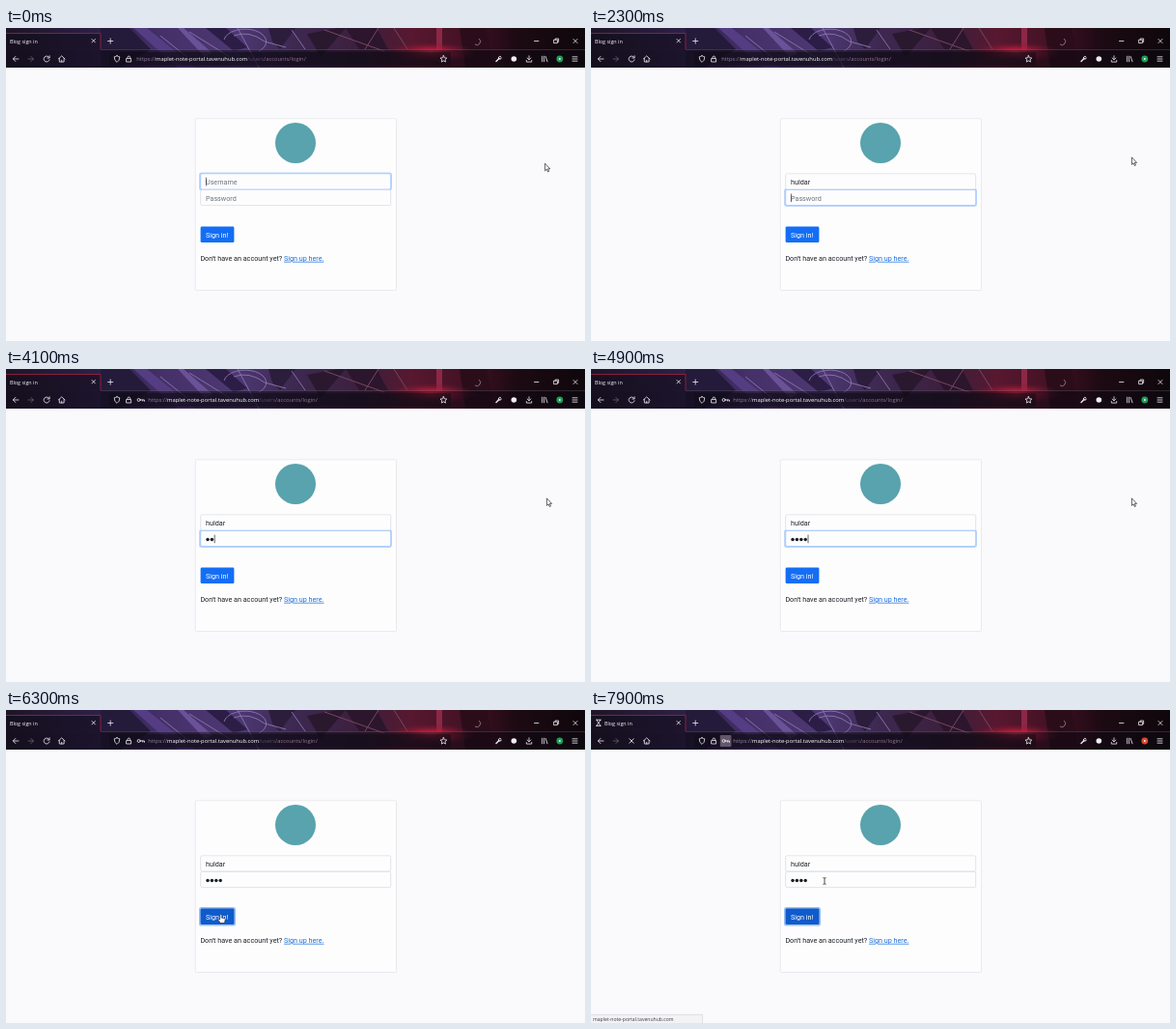
Animation, 600 px wide and 324 px high, one loop 8000 ms. Source, as an HTML page:

```html
<!DOCTYPE html>
<html lang="en">
<head>
<meta charset="utf-8">
<title>Blog sign in</title>
<style>
  html, body { margin: 0; width: 100%; height: 100%; overflow: hidden; background: #faf9fb; }
  svg { display: block; width: 600px; height: 324px; }
  .page { font: 7.2px Roboto, sans-serif; fill: #1c2024; }
  .chrome { font: 5.4px "Open Sans", "Noto Sans", sans-serif; fill: #f8f6fa; }
  .icon { fill: none; stroke: #f1eef4; stroke-width: .8; stroke-linecap: round; stroke-linejoin: round; }
  .hint { fill: #6c757d; }
  .field { fill: #fdfdfe; stroke: #ced4da; stroke-width: .6; }
  .field.on { stroke: #86b7fe; }
  .glow { fill: #bcd6fd; }
</style>
</head>
<body>
<svg viewBox="0 0 600 324">
  <defs>
    <linearGradient id="art">
      <stop offset="0" stop-color="#1d1528"/>
      <stop offset=".17" stop-color="#2e2148"/>
      <stop offset=".27" stop-color="#453069"/>
      <stop offset=".4" stop-color="#4d3873"/>
      <stop offset=".5" stop-color="#3d2850"/>
      <stop offset=".62" stop-color="#3c1f3c"/>
      <stop offset=".7" stop-color="#58182f"/>
      <stop offset=".8" stop-color="#421124"/>
      <stop offset=".88" stop-color="#1d0a13"/>
      <stop offset="1" stop-color="#0e070b"/>
    </linearGradient>
    <radialGradient id="neon">
      <stop offset="0" stop-color="#ff3452"/>
      <stop offset=".35" stop-color="#c21d3d" stop-opacity=".8"/>
      <stop offset="1" stop-color="#7a1530" stop-opacity="0"/>
    </radialGradient>
    <clipPath id="head"><path d="M0 0H600V41H0Z"/></clipPath>
  </defs>

  <!-- browser backdrop -->
  <g clip-path="url(#head)">
    <path d="M0 0H600V41H0Z" fill="url(#art)"/>
    <path d="M98 0H128L150 22L118 41H98Z" fill="#241a3a"/>
    <path d="M132 0H146L196 41H178Z" fill="#553d84"/>
    <path d="M178 0H184L214 26L206 30Z" fill="#6b5298"/>
    <path d="M207 0H228L250 20L236 24Z" fill="#2b1d45"/>
    <path d="M272 0H300L284 22L276 14Z" fill="#2c1d3c"/>
    <path d="M312 6L344 0H352L326 30Z" fill="#2a182f"/>
    <path d="M352 0H384L396 22H366Z" fill="#2c162d"/>
    <path d="M446 0H452V24H446Z" fill="#8c2746"/>
    <path d="M470 0H498L506 41H476Z" fill="#2b0d1a"/>
    <g fill="none" stroke="#8c78ae" stroke-width=".9">
      <path d="M226 12A22 13 0 1 1 262 24"/>
      <path d="M236 8Q252 2 268 14L290 20M240 0L262 41M190 4L232 30M296 2L310 22M160 8L190 32"/>
    </g>
    <path d="M330 2L392 24M386 0L372 22M402 0L416 22" fill="none" stroke="#75475f"/>
    <ellipse cx="440" cy="25.5" rx="46" ry="11" fill="url(#neon)"/>
    <path d="M486 17A3.4 3.4 0 0 0 490 11" fill="none" stroke="#a997b0" stroke-width=".7"/>
    <path d="M0 22.5H600V41H0Z" fill="#0d0912" opacity=".5"/>
    <path d="M0 5H98V22.5H0Z" fill="#110c18" opacity=".55"/>
    <path d="M0 5.5H98V22" fill="none" stroke="#a52440" stroke-width=".8"/>
    <path d="M98 22.4H600" stroke="#8d8292" stroke-width=".5" opacity=".6"/>
    <rect x="107" y="25" width="354" height="14" rx="1.5" fill="#100b17" opacity=".55"/>
  </g>

  <!-- tab strip and toolbar -->
  <g class="chrome">
    <text id="tab" x="4" y="15.5">Blog sign in</text>
    <text id="url" y="34" font-size="5.8" fill="#93839d"><tspan>https://</tspan><tspan fill="#fff">maplet-note-portal.tavenuhub.com</tspan><tspan fill="#5d4a68">/users</tspan><tspan fill="#94758d">/accounts/login/</tspan></text>
  </g>
  <g class="icon">
    <path d="M89 11.5l3.4 3.4m0-3.4l-3.4 3.4M105.6 13.5h5.2m-2.6-2.6v5.2M547.5 13.5h4.4M568 12.2h3.4v3.4h-3.4zM569.2 12v-1h3.4v3.4h-1M588 11.5l4 4m0-4l-4 4"/>
    <path d="M13 32H7.5m2.4-2.6L7.3 32l2.6 2.6"/>
    <path d="M23 32h5.2m-2.4-2.6l2.6 2.6l-2.6 2.6" opacity=".35"/>
    <path id="reload" d="M44.7 30.4a3 3 0 1 0 .4 2.4M45.1 28.8v2.2h-2.2"/>
    <path id="stop" d="M39.8 29.8l4.4 4.4m0-4.4l-4.4 4.4"/>
    <path d="M54.3 32l3.4-3.1l3.4 3.1M55.3 31.5v3.5h4.8v-3.5M57.7 35v-1.7"/>
    <path d="M115 28.8q1.4 1 2.8 1q0 4.2-2.8 5.6q-2.8-1.4-2.8-5.6q1.4 0 2.8-1z"/>
    <path d="M125 31.6h4.6v3.4H125zM126 31.4v-1a1.3 1.3 0 0 1 2.6 0v1"/>
    <path d="M453.4 28.6l1 2.2 2.4.3-1.8 1.6.5 2.4-2.1-1.2-2.1 1.2.5-2.4-1.8-1.6 2.4-.3z"/>
    <path d="M508 34.4l3-3" stroke-width="1.4"/>
    <path d="M512.8 29.8a1.4 1.4 0 1 0 .4 1.3" stroke-width="1"/>
    <circle cx="526.3" cy="32" r="2.8" fill="#f1eef4" stroke="none"/>
    <path d="M542 28.8v4m-1.9-1.8l1.9 1.9l1.9-1.9M539.3 33.5v1.6h5.4v-1.6"/>
    <path d="M555.6 29.2v5.6M557.6 29.2v5.6M559.2 29.5l1.8 5.3"/>
    <path d="M587 29.8h5M587 32h5M587 34.2h5"/>
  </g>
  <g id="key">
    <rect id="keyBox" x="133.8" y="26" width="11.6" height="12" rx="1" fill="#62586a"/>
    <path class="icon" d="M139.2 32h4.2v1.4M141.7 32v1.1"/>
    <circle class="icon" cx="137.6" cy="32" r="1.5"/>
  </g>
  <circle id="badge" cx="573.8" cy="32" r="3.4"/>
  <circle cx="573.8" cy="32" r="1" fill="#e9f5ec"/>

  <!-- sign-in card -->
  <g class="page">
    <rect x="196.3" y="93.8" width="208.2" height="177.7" rx="1" fill="#fdfdfe" stroke="#e3e3e7" stroke-width=".7"/>
    <circle cx="300" cy="119" r="21" fill="#58a3ad"/>
    <rect id="glow" class="glow" x="200" width="200" height="19" rx="2.4"/>
    <rect id="userBox" class="field" x="201.7" y="150.8" width="197" height="16.2" rx="1.6"/>
    <rect id="passBox" class="field" x="201.7" y="167.4" width="197" height="16.2" rx="1.6"/>
    <text id="user" x="207" y="161.8"></text>
    <text id="passHint" class="hint" x="207" y="178.7">Password</text>
    <g id="dots"></g>
    <path id="caret" stroke="#212529" stroke-width=".7"/>
    <rect id="ring" x="200" y="204" width="38" height="19.6" rx="2.6" fill="#9bbff5"/>
    <rect id="button" x="201.6" y="205.5" width="34.8" height="16.6" rx="1.4"/>
    <text x="207" y="216.6" fill="#fff">Sign in!</text>
    <text x="201.4" y="240.8">Don't have an account yet? <tspan fill="#1a6fd8" text-decoration="underline">Sign up here.</tspan></text>
  </g>

  <g id="status" class="chrome">
    <path d="M-1 315.4H115.6V325H-1Z" fill="#f3f3f6" stroke="#d0d0d6" stroke-width=".6"/>
    <text x="2" y="322" font-size="5.1" fill="#3d3d46">maplet-note-portal.tavenuhub.com</text>
  </g>
  <path id="hourglass" class="icon" stroke-width=".7" d="M5.4 10.2h4.8M5.4 16.4h4.8M6 10.3c0 2 3.6 4 3.6 6M9.6 10.3c0 2-3.6 4-3.6 6"/>

  <g id="pointer">
    <path id="arrow" d="M0 0V7.6L1.7 6L2.9 8.7L4.1 8.2L2.9 5.6H5.2Z" fill="#fff" stroke="#222" stroke-width=".7"/>
    <path id="hand" d="M-.8 .7Q0-.6 .8 .7V3.6L4.2 4.3Q5 4.6 4.8 5.6L4 9H-.1L-2.7 5.6Q-2.6 4.3-.8 5.5Z" fill="#fff" stroke="#222" stroke-width=".6"/>
    <path id="beam" d="M-1.5-3.4Q0-3.4 0-2.6Q0-3.4 1.5-3.4M0-2.6V2.6M-1.5 3.4Q0 3.4 0 2.6Q0 3.4 1.5 3.4" fill="none" stroke="#222" stroke-width=".8"/>
  </g>
</svg>
<script>
const LOOP = 8000, NAME = 'huldar';
const TYPED = [850, 1050, 1220, 1400, 1580, 1760];
const DOTTED = [3750, 4000, 4250, 4500];
const TO_PASSWORD = 2100, CLICK = 6200, LOADING = 6600;
// time, x, y of the pointer tip
const PATH = [[0, 558.6, 140.2], [100, 558.6, 140.2], [500, 560.4, 133.8], [4950, 560.4, 133.8],
  [5350, 470, 160], [5900, 222.4, 211.5], [6700, 222.4, 211.5], [7500, 242, 177], [LOOP, 242, 177]];

const $ = id => document.getElementById(id);
const set = (id, attrs) => { for (const k in attrs) $(id).setAttribute(k, attrs[k]); };
const show = (id, on) => { $(id).style.display = on ? '' : 'none'; };
const count = (times, t) => times.filter(s => s <= t).length;
const inside = (x, y, l, t, r, b) => x >= l && x <= r && y >= t && y <= b;

$('dots').innerHTML = DOTTED.map((_, i) => `<circle cx="${209 + i * 4.4}" cy="176.5" r="1.75"/>`).join('');

function pointerAt(t) {
  const i = PATH.findIndex(p => p[0] > t);
  const [t0, x0, y0] = PATH[i - 1], [t1, x1, y1] = PATH[i];
  const k = (t - t0) / (t1 - t0), e = k * k * (3 - 2 * k);
  return [x0 + (x1 - x0) * e, y0 + (y1 - y0) * e];
}

function drawForm(t) {
  const letters = count(TYPED, t), dots = count(DOTTED, t);
  const inUser = t < TO_PASSWORD, editing = t < CLICK;
  $('user').textContent = letters ? NAME.slice(0, letters) : 'Username';
  $('user').classList.toggle('hint', !letters);
  show('passHint', !dots);
  [...$('dots').children].forEach((d, i) => { d.style.display = i < dots ? '' : 'none'; });

  $('userBox').classList.toggle('on', inUser);
  $('passBox').classList.toggle('on', !inUser && editing);
  show('glow', editing);
  set('glow', { y: inUser ? 149.4 : 166 });

  const last = Math.max(0, ...[...TYPED, TO_PASSWORD, ...DOTTED].filter(s => s <= t));
  const width = inUser ? (letters ? $('user').getComputedTextLength() : 0) : dots * 4.4;
  show('caret', editing && (t - last) % 1000 < 500);
  set('caret', { d: `M${207.4 + width} ${inUser ? 154.8 : 171.6}v8.6` });

  show('key', dots > 0);
  set('url', { x: dots ? 147.3 : 135.3 });
}

function drawPointer(t) {
  const [x, y] = pointerAt(t);
  const onButton = inside(x, y, 201, 205, 237, 222);
  const onField = inside(x, y, 201, 150, 399, 184);
  set('pointer', { transform: `translate(${x} ${y})` });
  show('hand', onButton);
  show('beam', onField);
  show('arrow', !onButton && !onField);
  show('ring', t >= CLICK);
  set('button', { fill: onButton || t >= CLICK ? '#105bcb' : '#146ef5' });
}

function drawLoading(t) {
  const busy = t >= LOADING;
  ['hourglass', 'stop', 'status', 'keyBox'].forEach(id => show(id, busy));
  show('reload', !busy);
  set('tab', { x: busy ? 14 : 4 });
  set('badge', { fill: busy ? '#d9482f' : '#1f9d57' });
}

function frame(now) {
  const t = now % LOOP;
  drawForm(t);
  drawPointer(t);
  drawLoading(t);
  requestAnimationFrame(frame);
}
frame(0);
</script>
</body>
</html>
```
